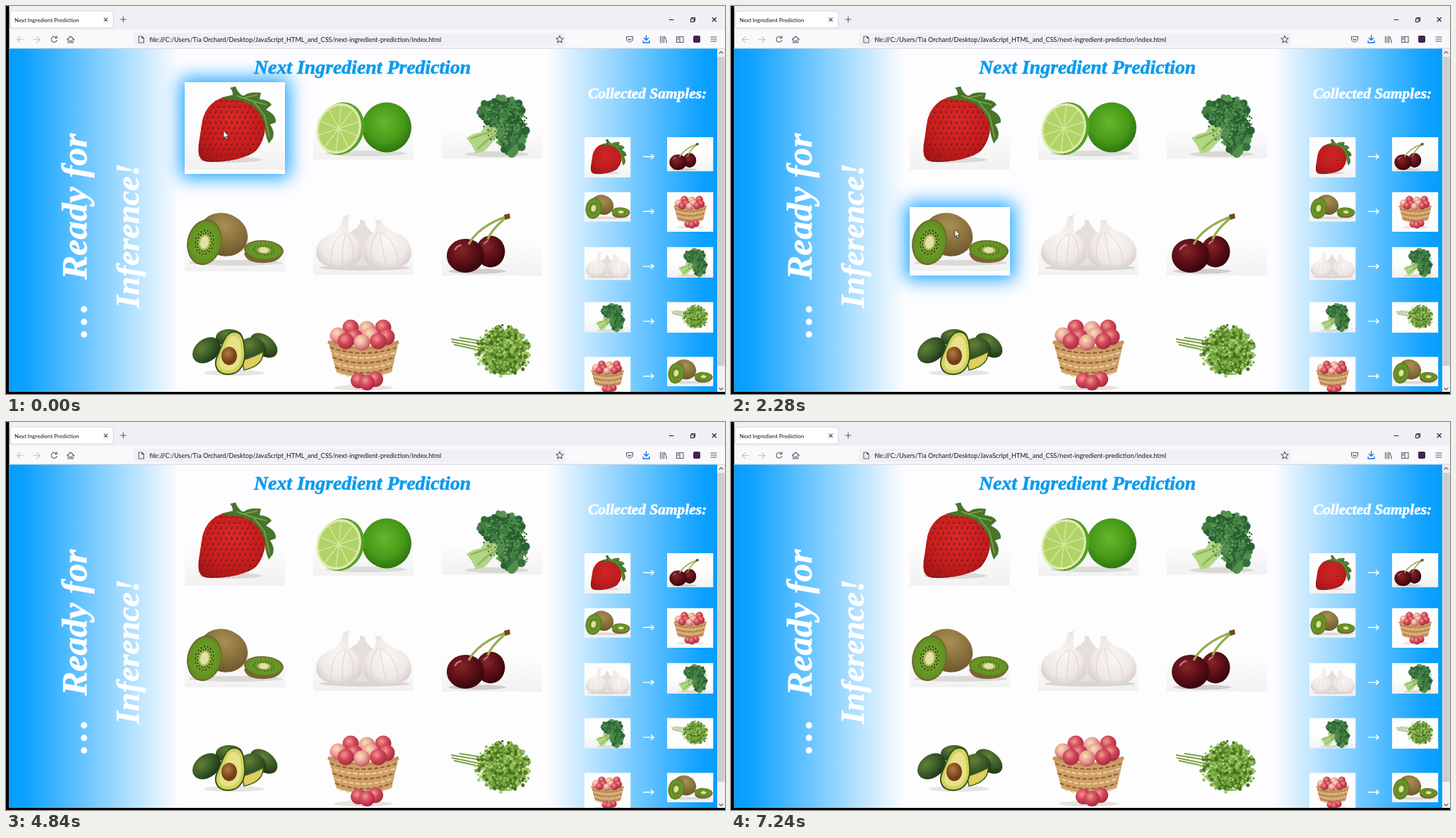
Write an HTML page that moves like this. It is 1018 by 550 pixels and loops after 7.28 s.

```html
<!DOCTYPE html>
<html lang="en">
<head>
<meta charset="utf-8">
<title>Next Ingredient Prediction</title>
<style>
  html, body { margin: 0; width: 100%; height: 100%; overflow: hidden; background: #000; }
  svg { display: block; }
  #stage { width: 1018px; height: 550px; }
  .ui { font-family: Lato, "Open Sans", sans-serif; fill: #15141a; }
  .brush {
    font-family: "Brush Script MT", "Liberation Serif", serif; font-style: italic; font-weight: bold;
    fill: currentColor; stroke: currentColor; stroke-width: .6;
  }
  .icon { fill: none; stroke: #5b5b66; stroke-width: 1.1; stroke-linecap: round; stroke-linejoin: round; }
  .glow { opacity: 0; }
  .halo { filter: blur(13px); }
</style>
</head>
<body>
<svg id="stage" viewBox="0 0 1018 550">
  <defs>
    <linearGradient id="side"><stop stop-color="#049dfe"/><stop offset=".1" stop-color="#0fa2ff"/><stop offset="1" stop-color="#fdfdff"/></linearGradient>
    <linearGradient id="sideR" href="#side" x1="1" x2="0"/>
    <linearGradient id="shade" x2="0" y2="1"><stop offset=".55" stop-color="#fdfdfd"/><stop offset="1" stop-color="#f2f1f2"/></linearGradient>
    <radialGradient id="red" cx=".5" cy=".4" r=".7"><stop stop-color="#dc2a28"/><stop offset=".6" stop-color="#c71b1c"/><stop offset="1" stop-color="#9a1114"/></radialGradient>
    <radialGradient id="limeSkin" cx=".45" cy=".4" r=".65"><stop stop-color="#68b52c"/><stop offset=".6" stop-color="#469a18"/><stop offset="1" stop-color="#2a6b0c"/></radialGradient>
    <radialGradient id="fuzz" cx=".45" cy=".3" r=".75"><stop stop-color="#a99052"/><stop offset="1" stop-color="#69542a"/></radialGradient>
    <radialGradient id="kiwiCut"><stop offset=".2" stop-color="#c3d065"/><stop offset=".5" stop-color="#6f9c2b"/><stop offset="1" stop-color="#5c9020"/></radialGradient>
    <radialGradient id="clove" cx=".5" cy=".45" r=".6"><stop stop-color="#faf6f3"/><stop offset=".7" stop-color="#efe8e5"/><stop offset="1" stop-color="#d9cfcd"/></radialGradient>
    <radialGradient id="wine" cx=".4" cy=".35" r=".65"><stop stop-color="#85252b"/><stop offset=".5" stop-color="#611118"/><stop offset="1" stop-color="#36070c"/></radialGradient>
    <radialGradient id="peel" cx=".4" cy=".3" r=".7"><stop stop-color="#63803a"/><stop offset=".6" stop-color="#375825"/><stop offset="1" stop-color="#1f3515"/></radialGradient>
    <radialGradient id="rosy" cx=".4" cy=".35" r=".65"><stop stop-color="#ee9a92"/><stop offset=".5" stop-color="#d4485a"/><stop offset="1" stop-color="#a52a40"/></radialGradient>
    <radialGradient id="pale" cx=".4" cy=".35" r=".65"><stop stop-color="#f8e3bd"/><stop offset=".55" stop-color="#e9a08f"/><stop offset="1" stop-color="#c25263"/></radialGradient>
    <radialGradient id="pit" cx=".4" cy=".35"><stop stop-color="#b27a45"/><stop offset="1" stop-color="#744018"/></radialGradient>
    <clipPath id="page"><rect x="4.500" y="60" width="1002.500" height="487"/></clipPath>
    <clipPath id="berryClip"><path d="M278 162C285 137 301 129 322 127C346 124 363 137 367 159C369 179 363 196 353 206C337 218 305 222 287 221C273 220 271 210 273 195Z"/></clipPath>

    <symbol id="strawberry" viewBox="253 108 142 124">
      <rect x="253" y="108" width="142" height="124" fill="url(#shade)"/>
      <ellipse cx="318" cy="218" rx="45" ry="4" fill="#cfc6c6" opacity=".6"/>
      <rect x="268" y="120" width="105" height="105" fill="url(#red)" clip-path="url(#berryClip)"/>
      <g id="pips" clip-path="url(#berryClip)"/>
      <path d="M304 130L321 126Q321 119 317 116L325 114Q328 123 336 128Q343 121 361 123L359 132Q372 133 376 140L368 147Q383 154 382 165L374 168Q381 178 378 187L372 195Q366 181 366 166L357 149L344 138L331 134Q318 134 304 130Z" fill="#48752b"/>
      <path d="M326 127L350 135L366 155L373 186M350 135L369 140M337 130L356 126" fill="none" stroke="#7fa648" stroke-width="1.600"/>
    </symbol>

    <symbol id="lime" viewBox="435 122 142 96">
      <rect x="435" y="122" width="142" height="96" fill="url(#shade)"/>
      <ellipse cx="510" cy="209" rx="58" ry="4" fill="#c9cfc3" opacity=".6"/>
      <ellipse cx="539" cy="172" rx="35" ry="35.500" fill="url(#limeSkin)"/>
      <g transform="rotate(22 472 174)">
        <ellipse cx="474" cy="173" rx="32.500" ry="38" fill="#5a9f27"/>
        <ellipse cx="471" cy="174" rx="31" ry="36.500" fill="#dfecae"/>
        <ellipse cx="471" cy="174" rx="28" ry="33" fill="#b1d368"/>
        <g id="wedges" stroke="#d9e8a6" stroke-width="1.300"/>
      </g>
    </symbol>

    <symbol id="broccoli" viewBox="617 122 142 94">
      <rect x="617" y="122" width="142" height="94" fill="url(#shade)"/>
      <ellipse cx="695" cy="210" rx="45" ry="4" fill="#c4cabf" opacity=".6"/>
      <path d="M652 187L663 181L672 179L690 152L712 175L694 187L684 199L677 206L665 209L660 198Z" fill="#b4d585"/>
      <path d="M658 188L684 179L699 160M667 203L685 187L705 178" fill="none" stroke="#8cb75c" stroke-width="2.500"/>
      <g id="heads"/>
    </symbol>

    <symbol id="kiwi" viewBox="253 285 142 91">
      <rect x="253" y="285" width="142" height="91" fill="url(#shade)"/>
      <ellipse cx="325" cy="364" rx="66" ry="4" fill="#c9c8c2" opacity=".6"/>
      <ellipse cx="308" cy="324" rx="35" ry="30" transform="rotate(22 308 324)" fill="url(#fuzz)"/>
      <path d="M337 350Q340 366 369 364Q391 362 392 347Z" fill="#7a6534"/>
      <g class="cut" transform="translate(365 346) rotate(4) scale(28 14)"/>
      <g class="cut" transform="translate(281 335) rotate(12) scale(24.500 32.500)"/>
    </symbol>

    <symbol id="garlic" viewBox="435 279 142 102">
      <rect x="435" y="279" width="142" height="102" fill="url(#shade)"/>
      <ellipse cx="508" cy="371" rx="64" ry="4" fill="#c7c0bf" opacity=".6"/>
      <path d="M480 337Q482 321 496 315Q502 309 501 303L507 304Q510 315 522 324V368H480Z" fill="#e6dedb"/>
      <path d="M439 351Q439 331 459 324Q475 317 477 298L485 296Q484 313 486 321Q503 332 503 350Q503 370 471 371Q441 370 439 351Z" fill="url(#clove)"/>
      <path d="M506 350Q506 331 519 322Q525 316 523 304L531 303Q534 315 550 320Q574 329 574 350Q573 372 540 372Q507 372 506 350Z" fill="url(#clove)"/>
      <path d="M479 322Q455 335 462 369M481 322Q474 345 477 370M484 324Q495 342 491 366M526 320Q510 342 522 368M529 320Q532 342 539 371M531 320Q556 337 555 369" fill="none" stroke="#dcd1cf" stroke-width="1"/>
    </symbol>

    <symbol id="cherry" viewBox="617 277 142 105">
      <rect x="617" y="277" width="142" height="105" fill="url(#shade)"/>
      <ellipse cx="667" cy="376" rx="41" ry="3.500" fill="#bdb3b4" opacity=".6"/>
      <ellipse cx="686" cy="348" rx="20.500" ry="22.500" fill="url(#wine)"/>
      <ellipse cx="650.500" cy="354" rx="26.500" ry="24" fill="url(#wine)"/>
      <path d="M655 338Q668 313 709 298M682 331Q687 317 709 299" fill="none" stroke="#9aa950" stroke-width="3.200"/>
      <path d="M707 303L705 296L713 294L714 301Z" fill="#6b4b20"/>
      <path d="M636 345Q639 340 644 339M677 337Q679 334 682 333" fill="none" stroke="#b97478" stroke-width="2.500" stroke-linecap="round"/>
    </symbol>

    <symbol id="avocado" viewBox="253 445 142 95">
      <rect x="253" y="445" width="142" height="95" fill="#fdfdfd"/>
      <ellipse cx="323" cy="520" rx="43" ry="4" fill="#d4d4ce" opacity=".6"/>
      <g fill="url(#peel)">
        <ellipse cx="316" cy="470" rx="19" ry="12"/>
        <ellipse cx="365" cy="481" rx="22" ry="14" transform="rotate(38 365 481)"/>
        <ellipse cx="348" cy="487" rx="20" ry="17"/>
        <ellipse cx="284" cy="488" rx="22" ry="16" transform="rotate(-38 284 488)"/>
      </g>
      <path d="M334 502Q350 498 364 490Q365 510 337 516Z" fill="#dfcf5e" stroke="#3f6322" stroke-width="1.500"/>
      <path d="M323 462C335 462 337 474 338 490C339 510 329 523 313 522C298 521 293 509 300 494C307 480 310 462 323 462Z" fill="#d3d35c" stroke="#345420" stroke-width="2"/>
      <path d="M323 468C331 468 333 480 333 492C333 508 325 517 313 516C302 515 300 506 305 495C312 481 314 468 323 468Z" fill="#e9e189"/>
      <ellipse cx="316" cy="496" rx="11" ry="13" fill="url(#pit)"/>
    </symbol>

    <symbol id="basket" viewBox="435 433 142 122">
      <rect x="435" y="433" width="142" height="122" fill="#fdfdfd"/>
      <ellipse cx="506" cy="541" rx="42" ry="4" fill="#d8d2cc" opacity=".6"/>
      <path d="M456 475Q506 493 556 475L546 519Q506 533 468 519Z" fill="#cfa069"/>
      <g id="weave" fill="none" stroke-width="2.200"/>
      <path d="M456 476Q506 494 556 476" fill="none" stroke="#c4935a" stroke-width="5"/>
      <g id="pile"/>
      <g id="fallen"/>
    </symbol>

    <symbol id="parsley" viewBox="617 443 142 95">
      <rect x="617" y="443" width="142" height="95" fill="#fdfdfd"/>
      <path d="M630 472L690 482M631 476L690 488M642 470L692 478M634 480L690 492" fill="none" stroke="#7c9f48" stroke-width="1.800"/>
      <g id="sprigs"/>
    </symbol>
  </defs>

  <!-- browser frame -->
  <rect width="1018" height="550" fill="#000"/>
  <rect x="4.500" width="1013.500" height="35" fill="#f0f0f4"/>
  <rect x="4.500" y="34" width="1013.500" height="27" fill="#f9f9fb"/>
  <rect x="6" y="7" width="146" height="24" rx="3" fill="#fff" stroke="#c9c9d0" stroke-width=".8"/>
  <text class="ui" x="12" y="22.500" font-size="7.900">Next Ingredient Prediction</text>
  <rect x="181" y="38" width="612" height="19" rx="3" fill="#f0f0f4"/>
  <text class="ui" x="203" y="51" font-size="9.100">file:///C:/Users/Tia Orchard/Desktop/JavaScript_HTML_and_CSS/next-ingredient-prediction/index.html</text>
  <g class="icon">
    <path d="M139 17l4.500 4.500m0-4.500l-4.500 4.500M162 19h8m-4-4v8"/>
    <path d="M25 47.500h-9m4-4l-4 4l4 4M39 47.500h9m-4-4l4 4l-4 4" stroke="#c4c4cb" style="stroke:#c4c4cb"/>
    <path d="M71.500 45A4 4 0 1 0 72 48.500M72 42.500v3h-3"/>
    <path d="M86.500 47.500l5-4.500l5 4.500M88 46.500v5.500h2.500v-3h2v3H95v-5.500"/>
    <path d="M188 43h4.500l2.500 2.500V52h-7zM192.500 43v2.500h2.500"/>
    <path d="M784 42l1.500 3.500l3.700.3l-2.900 2.400l.9 3.800l-3.200-2l-3.200 2l.9-3.800l-2.900-2.400l3.700-.3z"/>
    <path d="M878.500 43.500h9v3a4.500 4.500 0 0 1-9 0zM880.800 46.500l2.200 2l2.200-2"/>
    <path d="M906.500 42v6.500m-3-3l3 3l3-3M902 49.500v2.500h9v-2.500" stroke="#1673e6" stroke-width="1.400"/>
    <path d="M926.500 43v9M929 43v9M931.500 43v9M933 43.500l2.500 8.500"/>
    <path d="M949.500 43.500h9.500v8h-9.500zM954 43.500v8M951 45.500h1.500M951 47.500h1.500"/>
    <path d="M998 44h8M998 47h8M998 50h8"/>
  </g>
  <rect x="973" y="42" width="10" height="10" rx="2" fill="#40264f"/>
  <g class="icon" stroke-width="1" style="stroke:#222">
    <path d="M939 19.500h6M969.500 18h4.500v4.500h-4.500zM971 18v-1.500h4.500V21H974M1000 16.500l5.500 5.500m0-5.500l-5.500 5.500"/>
  </g>

  <!-- web page -->
  <g clip-path="url(#page)">
    <rect x="4" y="60" width="1003" height="488" fill="#fdfdff"/>
    <rect x="4" y="60" width="241" height="488" fill="url(#side)"/>
    <rect x="767" y="60" width="240" height="488" fill="url(#sideR)"/>
    <g class="brush" color="#fff">
      <text transform="translate(114 470) rotate(-90)" font-size="51" letter-spacing="5">...</text>
      <text transform="translate(114 388) rotate(-90)" font-size="51.500">Ready for</text>
      <text transform="translate(188 428) rotate(-90)" font-size="46.700">Inference!</text>
      <text x="824" y="131" font-size="21.400">Collected Samples:</text>
    </g>
    <g id="photos"/>
    <g id="glows"/>
    <text class="brush" x="351" y="96" font-size="27.800" color="#0a9bee">Next Ingredient Prediction</text>
    <g id="samples"/>
  </g>
  <rect x="1007" y="60" width="11" height="487" fill="#f0f0f0"/>
  <rect x="1007.500" y="72" width="10" height="438" fill="#cdcdcd"/>
  <rect x="4.500" y="59.500" width="1013.500" height="1" fill="#d3d3da"/>
  <path class="icon" d="M1010 67l2.500-2.500l2.500 2.500M1010 541.500l2.500 2.500l2.500-2.500"/>
  <path id="cursor" d="M0 0V10L2.300 8L4 11.800L5.700 11L4.100 7.400H7.200Z" fill="#fff" stroke="#222" stroke-width=".7"/>
</svg>

<script>
const LOOP = 7280;
const $ = id => document.getElementById(id);
function add(parent, tag, attrs) {
  const el = document.createElementNS("http://www.w3.org/2000/svg", tag);
  for (const k in attrs) el.setAttribute(k, attrs[k]);
  parent.appendChild(el);
  return el;
}
let seed = 11;
const rand = () => (seed = (seed * 16807) % 2147483647) / 2147483647;

// Seeded dots spread over an ellipse
function scatter(g, cx, cy, rx, ry, n, size, colors) {
  for (let i = 0; i < n; i++) {
    const a = i * 2.4, d = Math.sqrt((i + .5) / n);
    add(g, "circle", {
      cx: cx + Math.cos(a) * d * rx + rand() * 4 - 2,
      cy: cy + Math.sin(a) * d * ry + rand() * 4 - 2,
      r: size * (.7 + rand() * .6),
      fill: colors[Math.floor(rand() * colors.length)]
    });
  }
}

// Strawberry pips
for (let r = 0; r < 13; r++)
  for (let c = 0; c < 14; c++) {
    const x = 270 + c * 7.6 + (r % 2) * 3.8, y = 127 + r * 7.6;
    add($("pips"), "ellipse", { cx: x, cy: y, rx: 1.6, ry: 2, fill: "#7c1016" });
    add($("pips"), "circle", { cx: x - .3, cy: y - .4, r: .7, fill: "#c9773f" });
  }

// Lime segments
for (let i = 0; i < 10; i++) {
  const a = i * Math.PI / 5;
  add($("wedges"), "line", { x1: 471, y1: 174, x2: 471 + 28 * Math.cos(a), y2: 174 + 33 * Math.sin(a) });
}

// Kiwi faces, drawn on a unit circle
for (const g of document.querySelectorAll(".cut")) {
  add(g, "circle", { r: 1, fill: "#75602e" });
  add(g, "circle", { r: .94, fill: "url(#kiwiCut)" });
  for (let i = 0; i < 34; i++) {
    const a = i * Math.PI / 17, d = i % 2 ? .4 : .52;
    add(g, "circle", { cx: d * Math.cos(a), cy: d * Math.sin(a), r: .04, fill: "#323a17" });
  }
  add(g, "ellipse", { rx: .24, ry: .28, fill: "#dfe2a8" });
}

const florets = ["#2a6233", "#35703a", "#437f43", "#528f4c"];
scatter($("heads"), 701, 149, 32, 19, 75, 5, florets);
scatter($("heads"), 716, 182, 19, 27, 75, 5, florets);
scatter($("heads"), 707, 163, 31, 34, 130, 1.5, ["#68a05c", "#24582f", "#4a8a4c"]);

scatter($("sprigs"), 705, 489, 33, 32, 85, 4.5, ["#4b7a22", "#5d8f2d", "#73a43b"]);
scatter($("sprigs"), 704, 489, 39, 36, 230, 2, ["#8fbb52", "#446f20", "#74a33d", "#a8cb70"]);

// Apples in the basket: rows of [first x, y, count]
const fruit = (g, x, y, r, skin) => add(g, "circle", { cx: x, cy: y, r, fill: `url(#${skin})` });
for (const [x, y, n] of [[488, 456, 3], [470, 467, 4], [481, 475, 3]])
  for (let i = 0; i < n; i++)
    fruit($("pile"), x + i * 23, y + (i % 2) * 2, 11.5, (i + n) % 2 ? "rosy" : "pale");
for (const [x, y] of [[499, 531], [523, 529], [511, 534]]) fruit($("fallen"), x, y, 11, "rosy");
for (let r = 0; r < 6; r++) {
  const y = 484 + r * 7, inset = r * 1.7;
  add($("weave"), "path", {
    d: `M${459 + inset} ${y}Q506 ${y + 16} ${553 - inset} ${y}`,
    stroke: r % 2 ? "#ecd0a0" : "#8f6233", "stroke-dasharray": "6 3", "stroke-dashoffset": r * 4.5
  });
}

// Photos by name: x, y, height
const W = 142;
const photos = {
  strawberry: [253, 108, 124], lime: [435, 122, 96], broccoli: [617, 122, 94],
  kiwi: [253, 285, 91], garlic: [435, 279, 102], cherry: [617, 277, 105],
  avocado: [253, 445, 95], basket: [435, 433, 122], parsley: [617, 443, 95]
};
const place = (g, name, x, y, w) =>
  add(g, "use", { href: "#" + name, x, y, width: w, height: photos[name][2] * w / W });
for (const name in photos) place($("photos"), name, photos[name][0], photos[name][1], W);

const pairs = [["strawberry", "cherry"], ["kiwi", "basket"], ["garlic", "broccoli"], ["broccoli", "parsley"], ["basket", "kiwi"]];
pairs.forEach(([from, to], i) => {
  const y = 186 + i * 77.8;
  place($("samples"), from, 819, y, 65.5);
  place($("samples"), to, 936, y, 65.5);
  add($("samples"), "path", {
    d: `M902 ${y + 27.5}h15m-4-3.500l4 3.500l-4 3.500`, fill: "none", stroke: "#fff", "stroke-width": 1.4
  });
});

// Chosen item in blue, then predicted item in green: start and end in ms
const BLUE = "#1aa4ff", GREEN = "#3dfa4a";
const steps = [
  ["strawberry", BLUE, 0, 760], ["cherry", GREEN, 760, 1520],
  ["kiwi", BLUE, 2040, 2800], ["basket", GREEN, 2800, 3560],
  ["broccoli", BLUE, 5120, 5880], ["parsley", GREEN, 5880, 6640]
];
const anims = [];
const play = (el, frames) => anims.push(el.animate(frames, { duration: LOOP, iterations: Infinity }));
for (const [name, color, start, end] of steps) {
  const [x, y, h] = photos[name];
  const g = add($("glows"), "g", { class: "glow" });
  add(g, "rect", { class: "halo", x: x - 6, y: y - 6, width: W + 12, height: h + 18, fill: color });
  add(g, "rect", { x, y, width: W, height: h + 6, fill: "#fff" });
  place(g, name, x, y, W);
  const lit = [[0, start ? 0 : 1], [start, 1], [end, 0], [LOOP, 0]];
  play(g, lit.map(([t, opacity]) => ({ offset: t / LOOP, opacity, easing: "step-end" })));
}

// Pointer stops: ms, x, y
const stops = [
  [0, 308, 177], [1560, 308, 177], [1960, 317, 317], [4080, 317, 317],
  [4720, 732, 187], [6680, 732, 187], [7160, 800, 562], [LOOP, 800, 562]
];
play($("cursor"), stops.map(([t, x, y]) => ({
  offset: t / LOOP, transform: `translate(${x}px, ${y}px)`, easing: "ease-in-out"
})));
for (const a of anims) a.startTime = document.timeline.currentTime;
</script>
</body>
</html>
```
